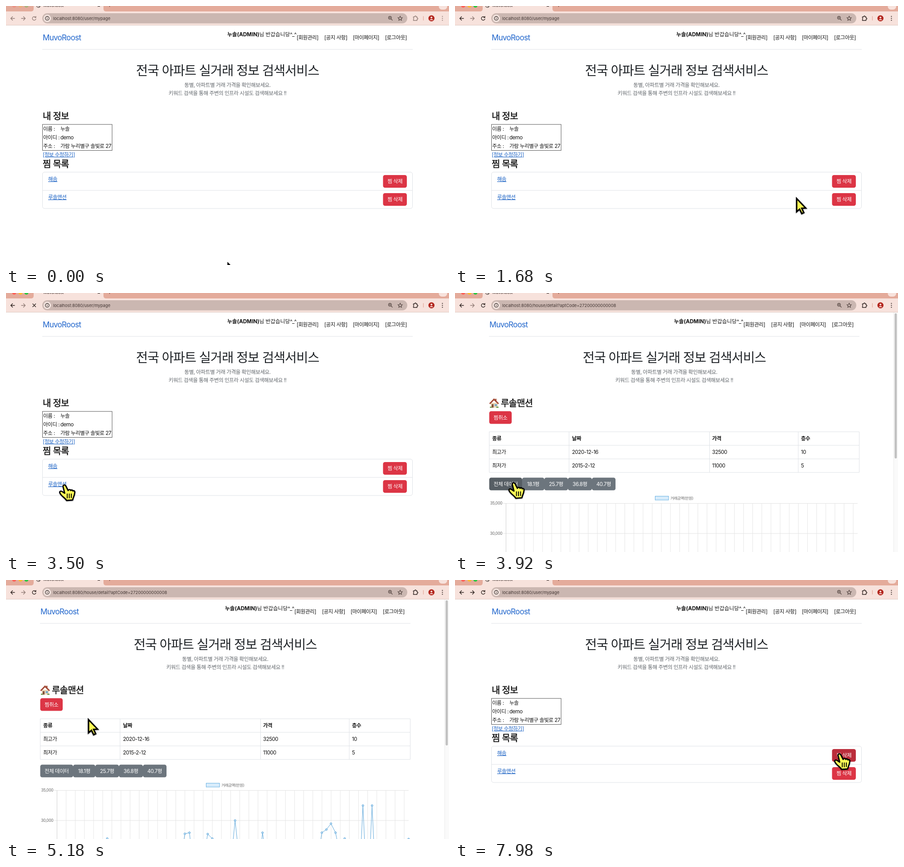
Animation of 977x573 px, one loop 8 s. Source, as an HTML page:

```html
<!DOCTYPE html>
<html lang="ko">
<head>
<meta charset="utf-8">
<style>
html, body { margin: 0; width: 100%; height: 100%; overflow: hidden; background: #fff; }
svg { display: block; width: 977px; height: 573px; }
text { font-family: Inter, "Noto Sans CJK KR", "Noto Sans CJK", sans-serif; letter-spacing: -.04em; white-space: pre; }
.ui { letter-spacing: 0; }
.h2 { stroke: #111; stroke-width: .45px; }
</style>
</head>
<body>
<svg id="stage" viewBox="0 0 977 573"></svg>
<script>
const LOOP = 8000, STEP = 70;
const INK = '#111', LINK = '#1b62c4', RED = '#dc3545', RED_HOVER = '#bb2d3b';
const GRAY = '#6c757d', GRAY_HOVER = '#565e64', BORDER = '#dee2e6';
const BRAND = 'MuvoRoost', MANSION = '루솔맨션';

const text = (x, y, s, size = 11.5, attrs = '') =>
  `<text x="${x}" y="${y}" font-size="${size}" fill="${INK}" ${attrs}>${s}</text>`;
const fill = c => `style="fill:${c}"`;
const mid = c => `text-anchor="middle" ${fill(c)}`;
const title = (x, y, s) => text(x, y, s, 20, 'class="h2"');
const link = (x, y, s) => text(x, y, s, 11.5, `text-decoration="underline" ${fill(LINK)}`);
const rect = (x, y, w, h, c, r = 0, attrs = '') =>
  `<rect x="${x}" y="${y}" width="${w}" height="${h}" rx="${r}" fill="${c}" ${attrs}/>`;
const circle = (x, y, r, c, attrs = '') => `<circle cx="${x}" cy="${y}" r="${r}" fill="${c}" ${attrs}/>`;
const line = (d, c, w = 1, attrs = '') =>
  `<path d="${d}" fill="none" stroke="${c}" stroke-width="${w}" ${attrs}/>`;
const group = (id, body, attrs = '') => `<g id="${id}" ${attrs}>${body}</g>`;
const button = (id, x, y, w, s, c) =>
  rect(x, y, w, 28, c, 4.3, `id="${id}"`) + text(x + w / 2, y + 18, s, 11.5, mid('#fff'));

function header() {
  return text(81, 76, BRAND, 17, fill('#2166cc')) +
    text(488, 67.3, '<tspan font-weight="700">누솔(ADMIN)</tspan>님 반갑습니당^_^', 11.7, 'class="ui"') +
    [[641, '회원관리'], [702, '공지 사항'], [765, '마이페이지'], [836, '로그아웃']]
      .map(([x, s]) => text(x, 73.7, `[${s}]`)).join('') +
    line('M80 96H897', BORDER) +
    text(488.5, 153.3, '전국 아파트 실거래 정보 검색서비스', 28.5, mid('#212529')) +
    text(488.5, 179.3, '동별, 아파트별 거래 가격을 확인해보세요.', 11.6, mid('#62676c')) +
    text(488.5, 197, '키워드 검색을 통해 주변의 인프라 시설도 검색해보세요 !!', 11.6, mid('#62676c'));
}

function myPage() {
  const rows = [['이름 :', '누솔'], ['아이디 :', 'demo'], ['주소 :', '가람 누리별구 솔빛로 27']];
  return title(81, 250.5, '내 정보') +
    rect(80.5, 262, 153.5, 57.5, 'none', 0, 'stroke="#555"') +
    rows.map(([k, v], i) => text(82, 275.8 + 19 * i, k) + text(120, 275.8 + 19 * i, v)).join('') +
    link(81, 332.5, '[정보 수정하기]') +
    title(81, 357, '찜 목록') +
    rect(80.5, 367.5, 816, 80.5, 'none', 4.5, `stroke="${BORDER}"`) +
    line('M80.5 408H896.5', BORDER) +
    link(93, 387, '해솜') + link(93, 427, MANSION) +
    button('del', 831.5, 374, 52.5, '찜 삭제', RED) + button('del2', 831.5, 414, 52.5, '찜 삭제', RED);
}

const house = rect(79, 243, 15, 10.5, '#e9d5b5') +
  rect(88.5, 234, 3, 6, '#a5573f') +
  '<path d="M75.5 244L86 233L97 244L95 246L86 237.5L77.5 246Z" fill="#a34a37"/>' +
  rect(81, 246, 4, 7.5, '#80513a') + rect(87.5, 246, 5, 4, '#71a9cb') +
  rect(77, 251.5, 4, 2.5, '#6c9b4c') + rect(91, 251.5, 5, 2.5, '#6c9b4c');

function detailPage() {
  const cols = [82, 258, 567, 763];
  const rows = [['종류', '날짜', '가격', '층수'], ['최고가', '2020-12-16', '32500', '10'], ['최저가', '2015-2-12', '11000', '5']];
  const tabs = [[75.5, 72.5, '전체 데이터'], [148, 49, '18.1평'], [197, 52, '25.7평'], [249, 53, '36.8평'], [302, 52, '40.7평']];
  let grid = '';
  for (let k = 0; k < 39; k++) grid += `M${112.5 + 20.15 * k} 465V573`;
  return house + title(101, 250.5, MANSION) +
    button('unlike', 75.5, 261.5, 49.5, '찜취소', RED) +
    line('M75.5 307H891.5M75.5 337H891.5M75.5 367H891.5M75.5 397H891.5M75.5 307V397M251.5 307V397M561.5 307V397M757 307V397M891.5 307V397', BORDER) +
    rows.map((r, i) => r.map((s, j) =>
      text(cols[j], 326 + 30 * i, s, 11.5, i ? '' : 'font-weight="700"')).join('')).join('') +
    tabs.map(([x, w, s], i) => button('tab' + i, x, 408.5, w, s, GRAY)).join('') +
    rect(441.5, 449.5, 29.5, 8.5, '#d7ecfb', 0, 'stroke="#69b1e2"') +
    text(475, 456.7, '거래금액(만원)', 8.5, fill('#666')) +
    line(grid, '#e6e6e6') + line('M106 465.5H888M106 532H888', '#e2e2e2') + line('M112.5 465V573', '#d0d0d0') +
    text(104.5, 468.4, '35,000', 8.7, 'text-anchor="end" ' + fill('#666')) +
    text(104.5, 535.2, '30,000', 8.7, 'text-anchor="end" ' + fill('#666')) +
    line('', '#5ba5d9', 1, 'id="curve"') + line('', '#4b9cd5', 1, 'id="dots" style="fill:#cfe7f8"') +
    rect(967, 43, 10, 530, '#fafafa') + line('M967.5 43V573', '#ebebeb') +
    rect(969.5, 45, 5, 321, '#c1c1c1', 2.5);
}

function chrome() {
  const icon = 'stroke-linecap="round" stroke-linejoin="round"';
  return rect(0, 0, 977, 43, '#e4ab9b') +
    '<path d="M55 12Q61 12 61 6V0H215V6Q215 12 221 12Z" fill="#f7e2dc"/>' +
    rect(0, 12, 977, 31, '#f7e2dc') + line('M0 42.5H977', '#dfc9c2') +
    group('lights', circle(18, -1, 4.5, '#fe5f57') + circle(32, -1, 4.5, '#febc2e') + circle(45, -1, 4.5, '#28c840')) +
    group('favicon', circle(71.5, -.8, 4, 'none', 'stroke="#4b4542" stroke-width="1.2"') + line('M69 0L72 -1L73 2', '#4b4542')) +
    text(82.5, 1.6, BRAND, 9, fill('#3a2e2b')) +
    line('M202.5 -3L207 1.5M207 -3L202.5 1.5', '#3a2e2b', 1.2) + line('M228.5 -5V2', '#6d4a40', 1.2) +
    rect(954.5, -10, 18.5, 18, '#f7e2dc', 7) +
    group('back', line('M19 27.5H10.5M14.5 23.5L10.5 27.5L14.5 31.5', 'currentColor', 1.4, icon)) +
    group('next', line('M34 27.5H42.5M38.5 23.5L42.5 27.5L38.5 31.5', 'currentColor', 1.4, icon)) +
    group('reload', line('M65.3 25A4 4 0 1 0 66 28.6M66 23V25.7H63.2', 'currentColor', 1.3, icon)) +
    group('stop', line('M59 24L65.5 30.5M65.5 24L59 30.5', 'currentColor', 1.4, icon)) +
    rect(80, 16, 805, 22.5, '#cbb7b1', 11.2) +
    circle(91, 27.3, 8.3, '#f1e2dd') + circle(91, 27.3, 4.2, 'none', 'stroke="#2c2523" stroke-width="1.2"') +
    line('M91 27V29.6M91 24.8V25.8', '#2c2523', 1.1) +
    '<text id="url" class="ui" x="104" y="30.7" font-size="9.25" fill="#433633"></text>' +
    circle(846.8, 26, 3.2, 'none', 'stroke="#4b3d39" stroke-width="1.2"') +
    line('M849.2 28.5L852.5 31.8M845.3 26H848.3M846.8 24.5V27.5', '#4b3d39', 1.1) +
    line('M869.3 22.5L870.8 25.7L874.2 26L871.6 28.3L872.4 31.7L869.3 29.9L866.2 31.7L867 28.3L864.4 26L867.8 25.7Z', '#4b3d39', 1.1) +
    group('menu',
      line('M898.5 24H901.5V23.5A1.5 1.5 0 0 1 904.5 23.5V24H906.5V26.5H907A1.5 1.5 0 0 1 907 29.5H906.5V32H898.5V29.5A1.7 1.7 0 0 0 898.5 26.5Z', 'currentColor', 1.3) +
      [23, 27.3, 31.6].map(y => circle(962.5, y, 1.1, 'currentColor')).join('')) +
    line('M920.5 22.5V32', '#e3a797', 1.2) +
    circle(938.3, 27.3, 6.7, '#b3261e') + circle(938.3, 25.5, 2, '#f6d9d3') +
    '<path d="M934.3 31.2Q938.3 26.3 942.3 31.2Z" fill="#f6d9d3"/>';
}

const beam = 'M-7.5 -17C-3 -17 0 -15 0 -11V11C0 15 -3 17 -7.5 17M7.5 -17C3 -17 0 -15 0 -11M7.5 17C3 17 0 15 0 11M-4 6H4';
const shapes = {
  arrow: '<path d="M2 5V34L8.5 28.5L13.3 38.3L17.8 36.3L13.3 26.5L22 26Z" fill="#fcfa55" stroke="#000" stroke-width="3.2"/>',
  hand: '<path d="M.5 4.5C-1 0 4.5 -1.5 6.5 2.5L11.5 12.5C13 9.5 16.5 10 17.5 12.5C18.5 10.5 21.7 11 22 13.5C25 12 27 14 26 18C25.5 25 22.5 27 21.5 33.5L8 34.5C6 30 0 27 -4 22C-8.5 17 -7.5 13 -3.5 14C-.5 15 1.5 17.5 4 18.5Z" fill="#fcfa55" stroke="#000" stroke-width="2.8" stroke-linejoin="round"/>' +
    line('M9.5 20V29M14 20V29M18.5 20V28.5', '#000', 1.9, 'stroke-linecap="round"'),
  beam: line(beam, '#000', 7, 'stroke-linecap="square"') + line(beam, '#fcf8a0', 3.2)
};

const stage = document.getElementById('stage');
stage.innerHTML = '<defs><filter id="shade" x="-50%" y="-50%" width="200%" height="200%">' +
  '<feDropShadow dx="0" dy="1" stdDeviation="1.3" flood-opacity=".35"/></filter></defs>' +
  group('page', header() + group('mine', myPage())) + group('detail', detailPage()) + chrome() +
  group('cursor', Object.keys(shapes).map(k => group(k, shapes[k])).join(''), 'filter="url(#shade)"');

const $ = id => document.getElementById(id);
const show = (id, on) => $(id).setAttribute('display', on ? 'inline' : 'none');
const tint = (id, c) => $(id).setAttribute('color', c);
const paint = (id, c) => $(id).setAttribute('fill', c);

// time, x, y
const path = [
  [0, 488, 565], [280, 440, 496], [840, 226, 436], [910, 226, 436], [1330, 748, 429],
  [1470, 745.5, 426], [1540, 745.5, 426], [1680, 751.5, 421], [1820, 751.5, 421],
  [2660, 132, 419], [2940, 125.5, 424.5], [3710, 125.5, 424.5], [4480, 128.5, 398], [4550, 128.5, 398],
  [5180, 180, 304], [7210, 180, 304], [7420, 190, 345], [7700, 600, 424], [7980, 844.5, 384.5], [LOOP, 844.5, 384.5]
];

function cursorAt(t) {
  const i = path.findIndex(p => p[0] > t), [t0, x0, y0] = path[i - 1], [t1, x1, y1] = path[i];
  const p = (t - t0) / (t1 - t0), e = p * p * (3 - 2 * p);
  return [x0 + (x1 - x0) * e, y0 + (y1 - y0) * e];
}

function cursorKind(t) {
  if (t >= 2590 && t < 4620 || t >= 7910) return 'hand';
  return t >= 6930 && t < 7350 ? 'beam' : 'arrow';
}

// point index: height on screen; the rest lie below the fold
const peaks = {
  11: 572, 28: 561.5, 29: 559, 33: 562, 34: 572, 39: 532, 45: 559, 58: 559, 59: 552, 60: 539,
  61: 559, 62: 608, 63: 572, 66: 715, 67: 499, 68: 715, 69: 499, 70: 715, 77: 573
};
const BASE = 934;

function drawChart(t) {
  const p = Math.min(1, Math.max(0, (t - 3836) / 1000)), k = 1 - (1 - p) ** 4;
  let curve = '', dots = '';
  for (let i = 0; i < 78; i++) {
    const x = 112.5 + 10.07 * i, rest = 650 + 30 * Math.sin(i * 2.3);
    const y = BASE - (BASE - (peaks[i] || rest)) * k;
    curve += `${i ? 'L' : 'M'}${x} ${y}`;
    dots += `M${x - 2} ${y}a2 2 0 1 0 4 0a2 2 0 1 0 -4 0`;
  }
  $('curve').setAttribute('d', curve);
  $('dots').setAttribute('d', dots);
}

function draw(t) {
  const detail = t >= 3780 && t < 6930, active = t >= 630, loading = t >= 3500 && t < 3780;
  const dark = active ? '#2c211e' : '#927d77';
  show('mine', !detail);
  show('detail', detail);
  $('page').setAttribute('transform', `translate(${detail ? -5 : 0} 0)`);
  $('url').textContent = 'localhost:8080/' +
    (t >= 3570 && t < 6930 ? 'house/detail?aptCode=27200000000008' : 'user/mypage');

  for (const id of ['back', 'reload', 'stop', 'menu']) tint(id, dark);
  tint('next', t >= 6930 ? dark : '#927d77');
  $('lights').setAttribute('opacity', active ? 1 : .3);
  show('reload', !loading);
  show('stop', loading);
  show('favicon', !loading);

  paint('del', t >= 7910 ? RED_HOVER : RED);
  paint('tab0', t < 4620 ? GRAY_HOVER : GRAY);
  if (detail) drawChart(t);

  const kind = cursorKind(t), [x, y] = cursorAt(t);
  for (const k in shapes) show(k, k === kind);
  $('cursor').setAttribute('transform', `translate(${x} ${y})`);
}

const start = performance.now();
function tick() {
  const t = (performance.now() - start) % LOOP;
  draw(Math.floor(t / STEP) * STEP);
  requestAnimationFrame(tick);
}
tick();
</script>
</body>
</html>
```
